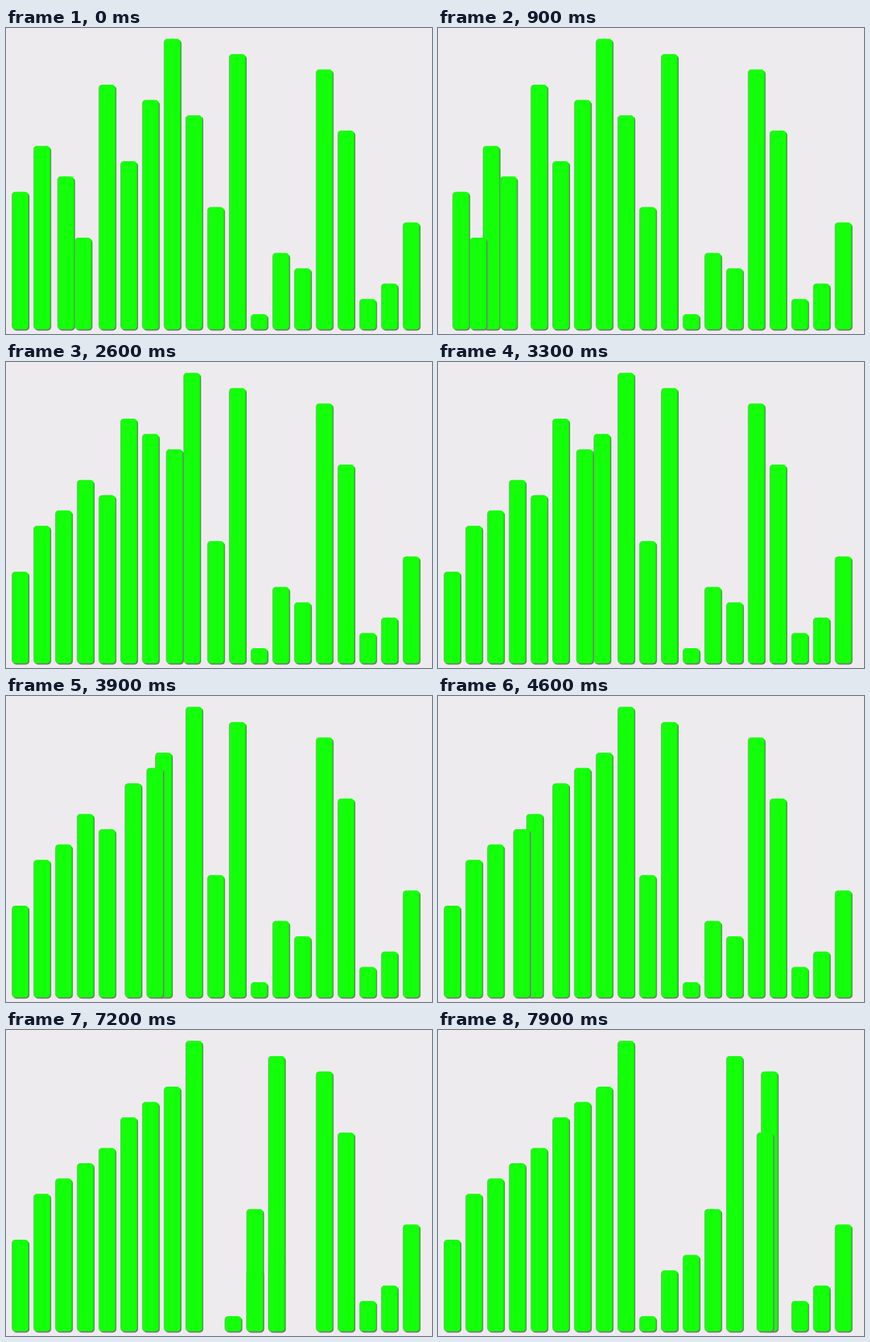
An HTML page with a canvas that plays this animation: 600 px wide and 432 px high, repeating every 8 s.

```html
<!DOCTYPE html>
<html lang="en">
<head>
<meta charset="utf-8">
<title>Merge sort</title>
<style>
  html, body { margin: 0; width: 100%; height: 100%; overflow: hidden; background: #eeebee; }
  canvas { display: block; }
</style>
</head>
<body>
<canvas id="stage" width="600" height="432"></canvas>
<script>
const ctx = document.getElementById('stage').getContext('2d');

const LOOP = 8000, TICK = 100;
const STEP_MS = 68.7, STEPS_PER_MERGE = 10, FIRST_STEP = 11.35;
const LEFT = 8, PITCH = 30.6, BASE = 425.6, UNIT = 21.6, WIDTH = 23.4, RADIUS = 5;

const values = [9, 12, 10, 6, 16, 11, 15, 19, 14, 8, 18, 1, 5, 4, 17, 13, 2, 3, 7];

// Each merge is recorded as the order before and after it.
const merges = [];
function mergeSort(list, from, to) {
  if (to - from < 2) return list;
  const mid = Math.floor((from + to) / 2);
  const before = mergeSort(mergeSort(list, from, mid), mid, to);
  const merged = before.slice(from, to).sort((a, b) => a - b);
  const after = [...before.slice(0, from), ...merged, ...before.slice(to)];
  merges.push({ before, after });
  return after;
}
mergeSort(values, 0, values.length);

function fillBar(x, y, height, color) {
  ctx.fillStyle = color;
  ctx.beginPath();
  ctx.roundRect(x, y, WIDTH, height, RADIUS);
  ctx.fill();
}

function drawBar(slot, value) {
  const x = LEFT + slot * PITCH;
  const height = value * UNIT;
  const y = BASE - height;
  fillBar(x + 1.6, y + 1.6, height, '#777777');
  fillBar(x, y, height, '#14ff0a');
}

function draw(time) {
  const step = Math.floor(FIRST_STEP + time / STEP_MS);
  const { before, after } = merges[Math.floor(step / STEPS_PER_MERGE)];
  const progress = (step % STEPS_PER_MERGE) / STEPS_PER_MERGE;
  ctx.fillStyle = '#eeebee';
  ctx.fillRect(0, 0, 600, 432);
  before.forEach((value, slot) =>
    drawBar(slot + (after.indexOf(value) - slot) * progress, value));
}

const start = performance.now();
function frame() {
  const time = (performance.now() - start) % LOOP;
  draw(Math.floor(time / TICK) * TICK);
  requestAnimationFrame(frame);
}
frame();
</script>
</body>
</html>
```
